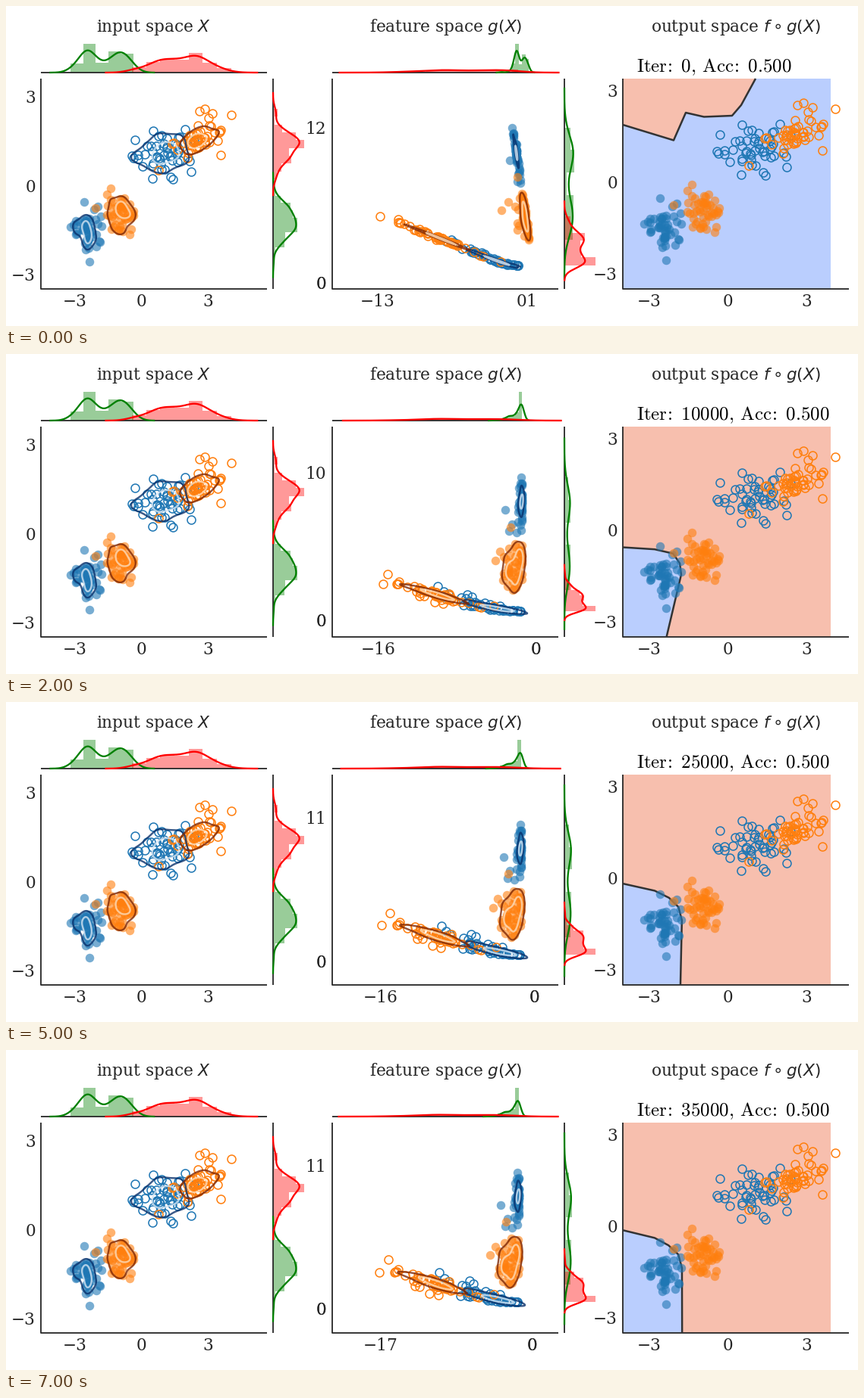
Recreate the animation shown at these times as a matplotlib script. Size 1123 by 423 pixels, loop 8 s.

```python
import numpy as np
import matplotlib.pyplot as plt
from matplotlib.animation import FuncAnimation

W, H, DPI = 1123, 423, 128
PT = 72 / DPI  # points per pixel
plt.rcParams["font.family"] = "DejaVu Serif"

BLUE, ORANGE, INK = "#1f77b4", "#ff7f0e", "#262626"
RING = {BLUE: ("#08306b", "#d3e4f3"), ORANGE: ("#7f2704", "#fddbb8")}
COOL, WARM = "#bacefe", "#f7bfae"

fig = plt.figure(figsize=(W / DPI, H / DPI), dpi=DPI, facecolor="white")
ax = fig.add_axes([0, 0, 1, 1])
rng = np.random.default_rng(7)


def cloud(n, center, sd, slope, strays):
    """Seeded normal cloud in input-panel pixels, plus a few far points."""
    p = rng.normal(size=(4 * n, 2))
    p = p[np.hypot(*p.T) < 2.1][:n]
    p = (p - p.mean(axis=0)) / p.std(axis=0) * sd
    p[:, 1] += slope * p[:, 0]
    return np.vstack([p + center, strays])


CLUSTERS = [
    (cloud(47, (107, 297), (9.5, 12), .15, [(103, 258.5), (121, 265), (109.5, 338)]), BLUE, True),
    (cloud(46, (151, 276), (9, 13), .3, [(118, 267), (138, 241), (133, 249), (168, 271)]), ORANGE, True),
    (cloud(46, (207, 195), (19, 14), -.2,
           [(169.5, 177), (235.5, 163), (220, 229), (243.5, 218.5)]), BLUE, False),
    (cloud(43, (253, 177), (15, 8), -.4,
           [(296.5, 143.5), (283, 197), (255, 139), (261.5, 136), (271.5, 142),
            (267, 148), (201, 217)]), ORANGE, False),
]


def blend(t, start, early, late):
    """Untrained state first, then an exponential approach from early to late."""
    start, early, late = (np.array(v, float) for v in (start, early, late))
    return early + (late - early) * (1 - np.exp(-.65 * (t - 1))) if t else start


def drift(t):
    """Sideways swing of the whole feature space during training."""
    return 5 * np.sin(np.pi * ((t - 1) / 6) ** .6) if t else 0


def softplus(x, width):
    return width * np.logaddexp(0, x / width)


def feature(p, solid, t):
    """Map input points to the feature panel."""
    x, y = p.T
    if solid:
        right, tilt, knee, slope, top = blend(
            t, (673, .27, 264, 1.2, 197), (676, 0, 286, .75, 201), (676, 0, 288, .8, 198))
        u = right + tilt * (x - 108) - softplus(slope * (knee - y), 4)
        v = top + 1.7 * (x - 108) - .4 * (y - 297)
    else:
        cx, cy, ux, uy, vx, vy, floor = blend(
            t, (569.5, 306, -1.81, 0, -.74, -.1, 343),
            (559, 327, -1.9, -.48, -.57, -.31, 346), (563, 307.5, -1.86, -.24, -.7, -.5, 333))
        x, y = x - 254, y - 176
        u, v = cx + ux * x + uy * y, cy + vx * x + vy * y
        u = 680 - softplus(680 - u, 28)
        v = floor - softplus(floor - v, 6)
    return np.column_stack([u + drift(t), v])


def label(x, y, s, ha="center", size=21.67, color=INK, **kw):
    ax.text(x, y, s, ha=ha, va="baseline", fontsize=size * PT, color=color, **kw)


def xtick(x, s):
    label(x, 396.7, s)


def ytick(x, y, s):
    label(x, y + 7.7, s, ha="right")


def line(x, y, color, width):
    ax.plot(x, y, color=color, lw=width * PT, solid_capstyle="butt")


def dots(p, color, solid):
    style = dict(mfc=color, mec="none", alpha=.6) if solid else dict(mfc="none", mec=color)
    ax.plot(p[:, 0], p[:, 1], "o", ms=(11.5 if solid else 11) * PT, mew=1.55 * PT, **style)


def rings(p, color):
    """Two density contours of a cluster."""
    mean, sd = p.mean(axis=0), p.std(axis=0)
    gx, gy = (np.linspace(m - 3 * s, m + 3 * s, 80) for m, s in zip(mean, sd))
    grid = np.stack(np.meshgrid(gx, gy), axis=-1)
    inv = np.linalg.inv(np.cov(p.T) * len(p) ** (-1 / 3))
    d = grid[:, :, None] - p
    z = np.exp(-.5 * np.einsum("abni,ij,abnj->abn", d, inv, d)).sum(axis=-1)
    ax.contour(gx, gy, z, levels=z.max() * np.array([.36, .74]), colors=RING[color],
               linewidths=2.4 * PT, alpha=.8)


def marginals(groups, base, size, top):
    """Histogram and density of two groups on one shared scale."""
    shapes = []
    for v in groups:
        h, edges = np.histogram(v, bins="fd", density=True)
        bw = v.std() * len(v) ** -.2
        x = np.linspace(v.min() - 3 * bw, v.max() + 3 * bw, 200)
        k = np.exp(-.5 * ((x[:, None] - v) / bw) ** 2).mean(axis=1) / (bw * np.sqrt(2 * np.pi))
        shapes.append((h, edges, x, k))
    scale = size / max(max(h.max(), k.max()) for h, _, _, k in shapes)
    if top:
        scale = -scale
    for color, (h, edges, x, k) in zip(("green", "red"), shapes):
        ax.stairs(base + scale * h, edges, baseline=base, fill=True, color=color, alpha=.4,
                  lw=0, orientation="vertical" if top else "horizontal")
        curve = base + scale * k
        line(*((x, curve) if top else (curve, x)), color, 2.3)


def joint(clusters, left):
    """Scatter, contours and both marginals of one panel."""
    for c in clusters:
        dots(*c)
    for p, color, _ in clusters:
        rings(p, color)
    groups = [np.vstack([p for p, _, s in clusters if s == solid]) for solid in (True, False)]
    marginals([g[:, 0] for g in groups], 88, 38, True)
    marginals([g[:, 1] for g in groups], left + 306, 41, False)


def input_panel():
    label(194.5, 34, "input space $X$")
    for v, s in ((-3, "−3"), (0, "0"), (3, "3")):
        xtick(178.3 + 29.2 * v, s)
        ytick(39, 238 - 39.2 * v, s)
    joint(CLUSTERS, 46)


def feature_panel(t):
    label(579.5, 34, "feature space $g(X)$")
    y_top, y_zero, x_left, x_zero = blend(
        t, (161, 366, 490, 680), (161, 362, 488, 695), (153, 342, 494, 693.5))
    ytick(422, y_top, str(min(8 + t, 11) if t else 12))
    xtick(x_left, f"−{16 + t // 7 if t else 13}")
    for k in range(2):
        ytick(422, y_zero, "0")
        xtick(x_zero + drift(t) + (0 if t else 12.5 * k), "0" if t else str(k))
    joint([(feature(p, solid, t), color, solid) for p, color, solid in CLUSTERS], 430)


def output_panel(t):
    label(962, 34, r"output space $f\circ g(X)$")
    label(831, 87, rf"$\mathrm{{Iter\!:\ {5000 * t},\,Acc\!:\ 0.500}}$", ha="left",
          size=25, color="black", math_fontfamily="cm")
    if t:
        back, front, corner = WARM, COOL, (813, 374)
        edge = blend(t, 0, [(813, 272), (855, 267.5), (885, 269), (890, 283), (889, 295), (851, 374)],
                     [(813, 237.5), (855, 248), (873, 258), (886, 270), (891, 288), (892, 374)])
    else:
        back, front, corner = COOL, WARM, (813, 96)
        edge = [(813, 157), (880, 177.5), (896, 141), (920, 146.5), (957, 145), (969, 131), (988, 96)]
    ax.fill([813, 1087, 1087, 813], [96, 96, 374, 374], color=back, lw=0)
    ax.fill(*np.vstack([edge, corner]).T, color=front, lw=0)
    line(*np.transpose(edge), "#333333", 2.5)
    for v, s in ((-3, "−3"), (0, "0"), (3, "3")):
        xtick(951.5 + 34.75 * v, s)
        ytick(806, 233 - 40.4 * v, s)
    for p, color, solid in CLUSTERS:
        dots((p - (178, 238)) * (1.19, 1.031) + (951.5, 233), color, solid)


def frame_lines():
    for x in (46, 430, 813):
        line([x, x, x + 298], [96, 374, 374], INK, 1.8)
    for x in (46, 430):
        line([x, x + 298], [88, 88], INK, 1.8)
        line([x + 306, x + 306], [96, 374], INK, 1.8)


def draw(t):
    ax.cla()
    ax.set_xlim(0, W)
    ax.set_ylim(H, 0)
    ax.axis("off")
    frame_lines()
    input_panel()
    feature_panel(t)
    output_panel(t)
    return []


anim = FuncAnimation(fig, draw, frames=8, interval=1000, repeat=True)
plt.show()
```
